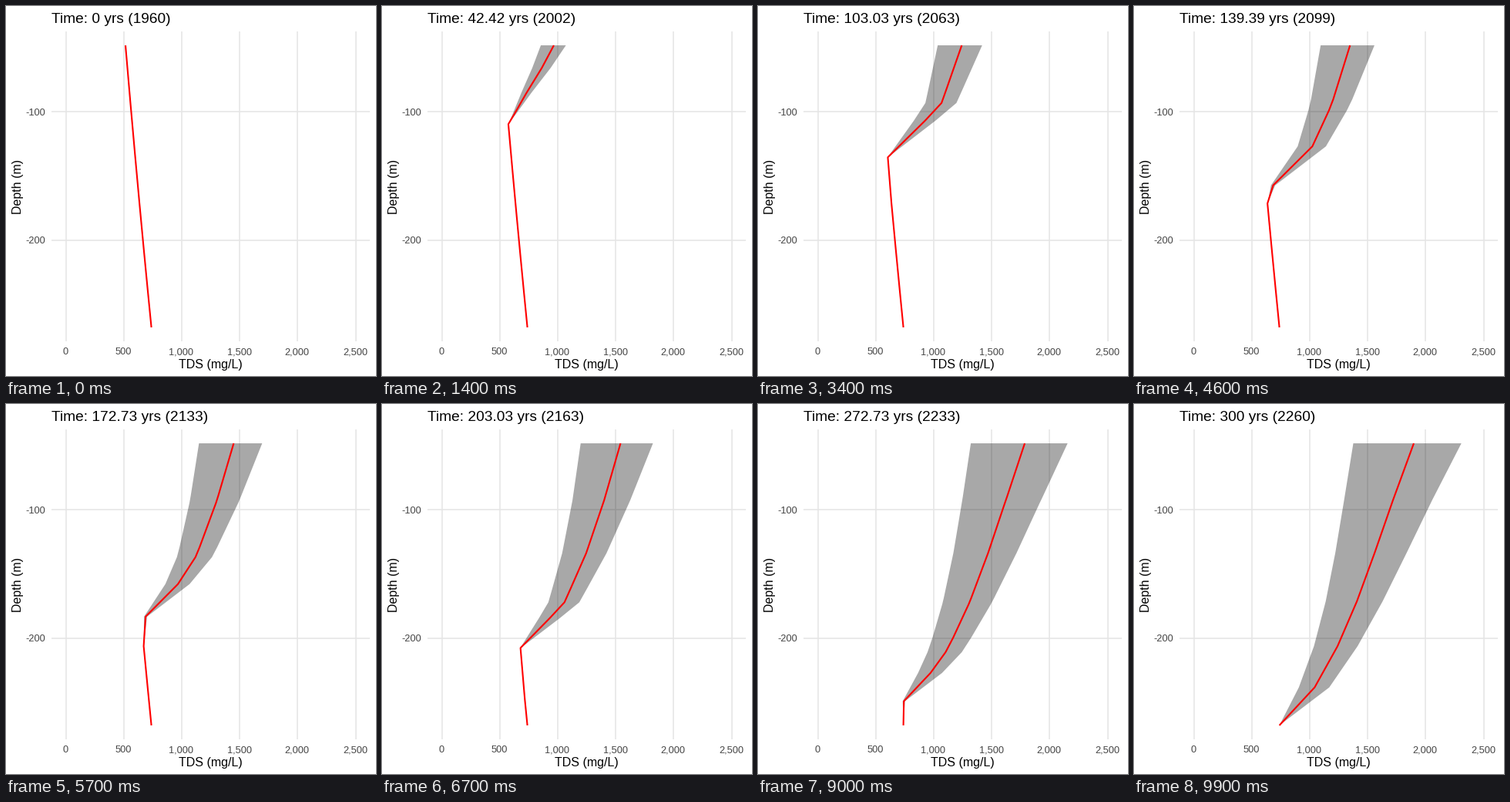
A matplotlib script that plays this animation: 480x480 px, repeating every 10000 ms.

```python
import numpy as np
import matplotlib.pyplot as plt
from matplotlib.animation import FuncAnimation

SIZE, DPI, FRAMES = 480, 100, 100
PX = 72 / DPI
X0, X_SCALE, Y_SCALE = 77.8, 0.1503, 1.668   # pixels per mg/L and per metre
LAYERS, POINTS = 7, 50

plt.rcParams["font.family"] = ["Liberation Sans", "DejaVu Sans"]

# Layers from top to bottom: each is thinner, and initially saltier
layer = np.arange(LAYERS)
depth = 51 + 74 * (1 - 0.922 ** layer) / (1 - 0.922)
base = 155 + 6.5 * layer - 0.15 * layer ** 2

# Median, low and high salinity after 1, 2, 4 and 6 flushes of a layer
flushed = [np.polyfit([1, 2, 4, 6], xs, 3) for xs in (
    (237.5, 263, 308, 363), (217, 232.4, 257, 284.5), (256.5, 289, 349.5, 424.7))]


def profile(curve, step):
    """Salinity by layer: the front sinks one layer with every step."""
    n = step - layer
    salty = np.polyval(curve, n) + 0.9 * layer * (n - 1.7)
    return np.where(n > 0, salty, base)


def resample(step):
    """Split every edge evenly, in proportion to its length, from the bottom up."""
    cols = np.array([depth] + [profile(c, step) for c in flushed])[:, ::-1]
    seg = np.hypot(np.diff(cols[1]) / X_SCALE, np.diff(cols[0]) / Y_SCALE)
    cum = np.r_[0, np.cumsum(seg)]
    at = layer + np.floor((POINTS - 5) * cum / cum[-1])
    at[-1] = POINTS - 1
    return np.array([np.interp(np.arange(POINTS), at, c) for c in cols])


states = [resample(step) for step in range(LAYERS)]
keys = [int((FRAMES - 1) * s / (LAYERS - 1) + 0.5) for s in range(LAYERS)]

fig = plt.figure(figsize=(SIZE / DPI, SIZE / DPI), dpi=DPI, facecolor="white")
ax = fig.add_axes([0, 0, 1, 1])
ax.set_xlim(0, SIZE)
ax.set_ylim(SIZE, 0)
ax.axis("off")


def label(x, y, text, size, color="black", ha="center", **kw):
    return ax.text(x, y, text, fontsize=size * PX, color=color, ha=ha,
                   va="baseline", **kw)


grid = dict(color="#E6E6E6", lw=1.6 * PX, solid_capstyle="butt", zorder=1)
for tds in range(0, 2501, 500):
    x = X0 + tds * X_SCALE
    ax.plot([x, x], [32.5, 434.5], **grid)
    label(x - 0.6, 452.5, f"{tds:,}", 12.8, "#444444")
for metres in (-100, -200):
    y = 137.1 - (metres + 100) * Y_SCALE
    ax.plot([58.7, 472], [y, y], **grid)
    label(51.5, y + 4.6, str(metres), 12.8, "#444444", "right")

label(265.6, 470, "TDS (mg/L)", 16)
label(20.3, 234, "Depth (m)", 16, rotation=90, rotation_mode="anchor")
title = label(58.7, 22, "", 19.2, ha="left")

ribbon, = ax.fill([0, 0, 0], [0, 0, 0], color="black", alpha=0.34, lw=0, zorder=2)
line, = ax.plot([], [], color="red", lw=2.1 * PX, zorder=3,
                solid_capstyle="butt", solid_joinstyle="round")


def update(i):
    k = min(np.searchsorted(keys, i, side="right") - 1, LAYERS - 2)
    a = (i - keys[k]) / (keys[k + 1] - keys[k])
    y, mid, low, high = (1 - a) * states[k] + a * states[k + 1]
    line.set_data(mid, y)
    ribbon.set_xy(np.c_[np.r_[low, high[::-1]], np.r_[y, y[::-1]]])
    years = 300 * i / (FRAMES - 1)
    title.set_text(f"Time: {round(years, 2):g} yrs ({round(1960 + years)})")
    return ribbon, line, title


anim = FuncAnimation(fig, update, frames=FRAMES, interval=100, repeat=True,
                     repeat_delay=0, init_func=lambda: update(0))
plt.show()
```
